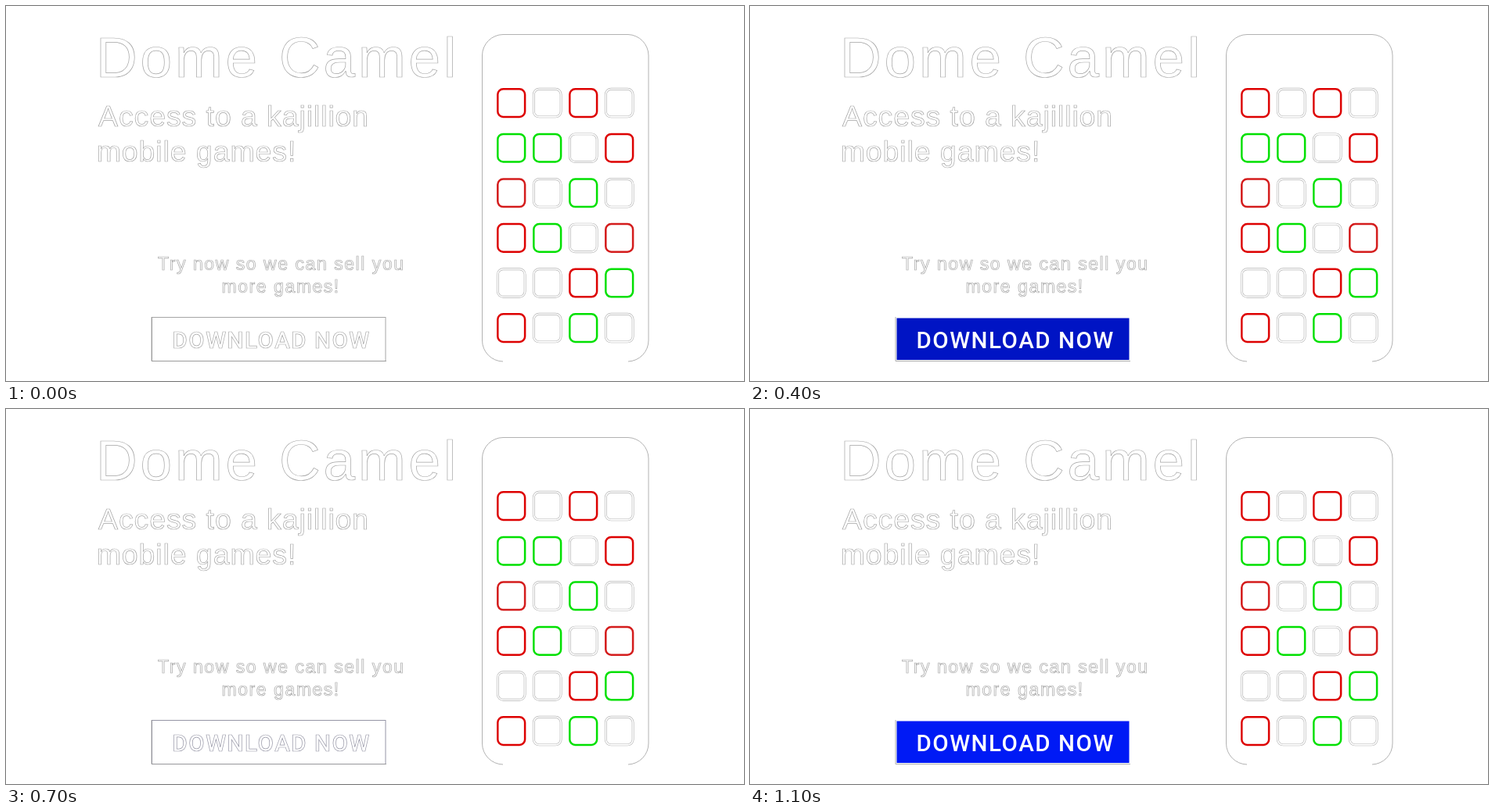
These frames come from a looping animation (943x480 px, 1400 ms). An HTML page:

```html
<!DOCTYPE html>
<html lang="en">
<head>
<meta charset="utf-8">
<title>Game banner</title>
<style>
  html, body { margin: 0; width: 100%; height: 100%; overflow: hidden; background: #fff; }
  svg { display: block; width: 943px; height: 480px; }
  text { fill: #fff; stroke: #a2a2a2; stroke-width: .7; font-family: "Liberation Sans", Arial, sans-serif; }
  .title { font-size: 73px; letter-spacing: 3.8px; }
  .lead { font-size: 37.5px; letter-spacing: .9px; }
  .note { font-size: 23px; letter-spacing: 1.55px; }
  #label { font: 500 29.5px Roboto, Arial, sans-serif; letter-spacing: 1.5px; }
  path, rect { fill: none; }
</style>
</head>
<body>
<svg viewBox="0 0 943 480">
  <text class="title" x="115" y="91">Dome Camel</text>
  <text class="lead" x="118" y="153.5">Access to a kajillion</text>
  <text class="lead" x="115.7" y="198.5">mobile games!</text>
  <text class="note" x="194" y="337.5">Try now so we can sell you</text>
  <text class="note" x="275.5" y="367">more games!</text>

  <rect id="frame" x="186.5" y="398.5" width="298.5" height="56"/>
  <path d="M186 398V454.5H486" stroke="#999" stroke-width=".8"/>
  <rect id="fill" x="187.5" y="399.5" width="297" height="53.5"/>
  <text id="label" x="212.5" y="437.5">DOWNLOAD NOW</text>

  <path d="M635 455A27 27 0 0 1 608.5 428V63A27 27 0 0 1 635 36.5H795A27 27 0 0 1 821 63V428A27 27 0 0 1 795 455"
        stroke="#aaa" stroke-width=".9"/>
  <g id="apps"></g>
</svg>
<script>
const $ = id => document.getElementById(id);
const grid = ["R.R.", "GG.R", "r.G.", "RG.r", "..RG", "R.G."];
const colors = { R: "#dd0000", r: "#d41c1c", G: "#00e000" };

function tile(col, row, stroke, width) {
  const rect = document.createElementNS("http://www.w3.org/2000/svg", "rect");
  const attrs = { x: 628.3 + col * 46, y: 106.3 + row * 57.6, width: 34.8, height: 35.6, rx: 7, stroke, "stroke-width": width };
  for (const key in attrs) rect.setAttribute(key, attrs[key]);
  $("apps").append(rect);
}

grid.forEach((line, row) => [...line].forEach((key, col) => {
  if (colors[key]) return tile(col, row, colors[key], 2.5);
  // A white band with faint edges
  tile(col, row, "#b4b4b4", 2.9);
  tile(col, row, "#fff", 1.6);
}));

// Button opacity per 100 ms; under one half only its edges show
const levels = [0, .2, .4, .64, .8, 1, .64, .1, .64, .1, .64, 1, 1, 1];

function draw(now) {
  const level = levels[Math.floor(now % 1400 / 100)];
  const solid = level >= .5;
  const shade = 165 - level * 165;
  const edge = solid ? "none" : `rgb(${shade},${shade},165)`;
  $("fill").style.fill = solid ? `rgb(0,${30 * level - 4},${245 * level})` : "none";
  $("fill").style.stroke = level > .3 && !solid ? edge : "none";
  $("fill").style.strokeWidth = .6;
  $("frame").style.stroke = edge;
  $("label").style.stroke = edge;
}

const start = performance.now();
function tick() {
  draw(performance.now() - start);
  requestAnimationFrame(tick);
}
tick();
</script>
</body>
</html>
```
